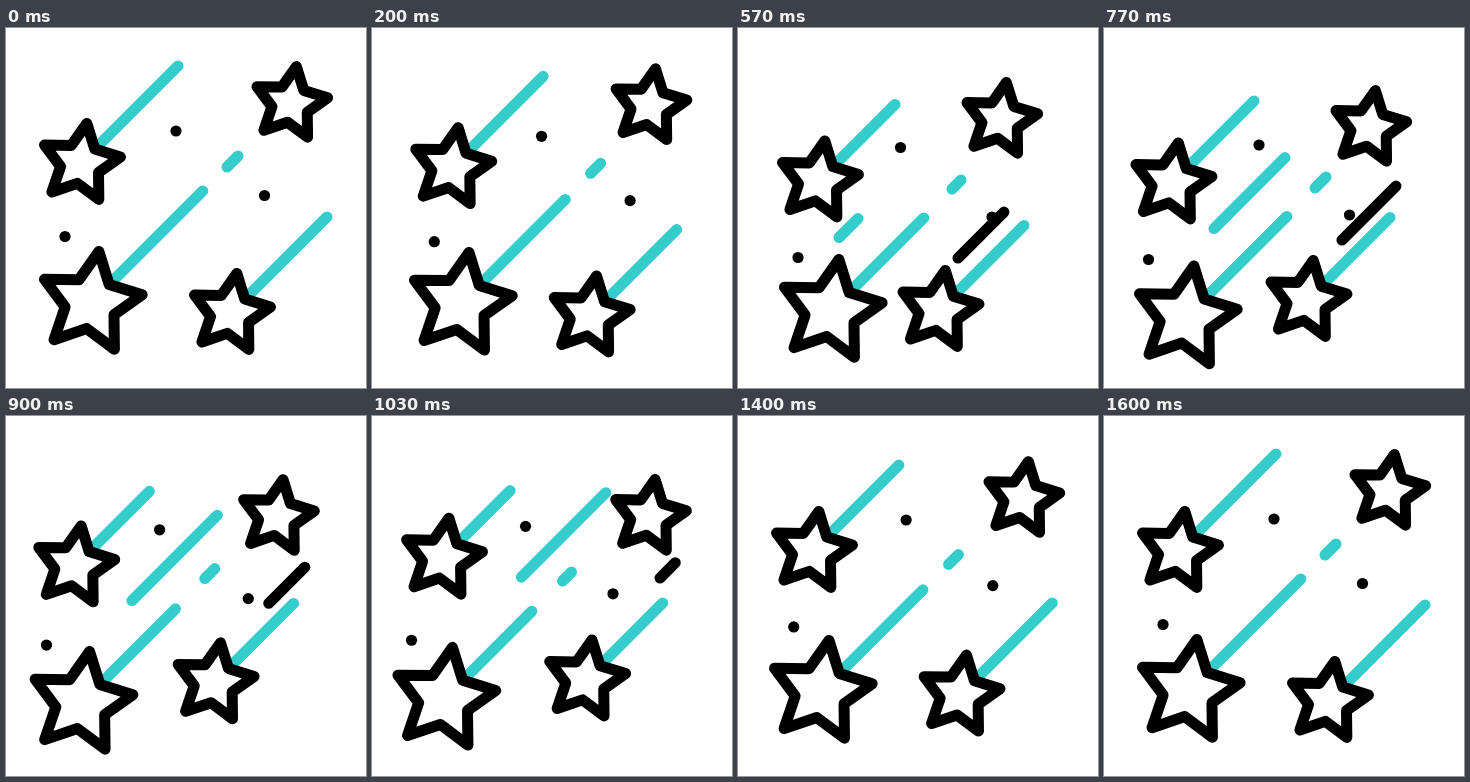
An HTML page that plays this animation: 360 by 360 pixels, repeating every 1670 ms.

```html
<!DOCTYPE html>
<html lang="en">
<head>
<meta charset="utf-8">
<title>Shooting stars</title>
<style>
  html, body { margin: 0; width: 100%; height: 100%; overflow: hidden; background: #fff; }
  svg { display: block; width: 100%; height: 100%; }
  path, line { stroke-width: 11; stroke-linecap: round; stroke-linejoin: round; }
</style>
</head>
<body>
<svg id="stage" viewBox="0 0 360 360"></svg>
<script>
const LOOP = 1670, STEP = 100 / 3;
const CYAN = '#35cccc', INK = '#000';
const TIMES = [33, 370, 570, 770, 1030, 1230, 1600];
const svg = document.getElementById('stage');

function add(tag, attrs) {
  const el = document.createElementNS('http://www.w3.org/2000/svg', tag);
  set(el, attrs);
  return svg.appendChild(el);
}

function set(el, attrs) {
  for (const name in attrs) el.setAttribute(name, attrs[name]);
}

// Smooth curve through key values, at rest at both ends and at turning points.
function curve(values, times = TIMES) {
  const last = values.length - 1;
  const slope = i => (values[i + 1] - values[i]) / (times[i + 1] - times[i]);
  const tangent = values.map((v, i) => {
    if (i === 0 || i === last || slope(i - 1) * slope(i) <= 0) return 0;
    return (values[i + 1] - values[i - 1]) / (times[i + 1] - times[i - 1]);
  });
  return t => {
    if (t <= times[0]) return values[0];
    if (t >= times[last]) return values[last];
    let i = 0;
    while (t > times[i + 1]) i++;
    const d = times[i + 1] - times[i], u = (t - times[i]) / d, w = 1 - u;
    return w * w * ((1 + 2 * u) * values[i] + u * d * tangent[i]) +
           u * u * ((3 - 2 * u) * values[i + 1] - w * d * tangent[i + 1]);
  };
}

// Closed track: the first value is also the last one.
const loop = values => curve([...values, values[0]]);

function starPath(r) {
  const points = Array.from({ length: 10 }, (_, i) => {
    const a = (-81 + 36 * i) * Math.PI / 180, d = i % 2 ? r * 0.5 : r;
    return (d * Math.cos(a)).toFixed(2) + ' ' + (d * Math.sin(a)).toFixed(2);
  });
  return 'M' + points.join('L') + 'Z';
}

const parts = [];

// Line on the diagonal x + y = sum, trimmed between tail and head.
function streak(color, sum, times, tail, head) {
  const el = add('line', { stroke: color });
  const a = curve(tail, times), b = curve(head, times);
  const start = times[0], end = times[times.length - 1];
  parts.push(t => {
    const x1 = a(t), x2 = b(t);
    set(el, {
      x1, y1: sum - x1, x2, y2: sum - x2,
      visibility: t > start && t < end ? 'visible' : 'hidden'
    });
  });
}

function star(cx, cy, r, dx, dy, trail) {
  const x = loop(dx), y = loop(dy), length = trail && loop(trail);
  const tail = trail && add('line', { stroke: CYAN });
  const body = add('path', { d: starPath(r), fill: '#fff', stroke: INK });
  parts.push(t => {
    const px = cx + x(t), py = cy + y(t);
    set(body, { transform: `translate(${px} ${py})` });
    if (!tail) return;
    const a = r * 0.36, b = length(t);
    set(tail, { x1: px + a, y1: py - a, x2: px + b, y2: py - b });
  });
}

function dot(xs, ys) {
  const el = add('circle', { r: 5.6, fill: INK });
  const x = loop(xs), y = loop(ys);
  parts.push(t => set(el, { cx: x(t), cy: y(t) }));
}

function dash(xs, ys, halves) {
  const el = add('line', { stroke: CYAN });
  const x = loop(xs), y = loop(ys), half = loop(halves);
  parts.push(t => {
    const px = x(t), py = y(t), h = half(t);
    set(el, { x1: px - h, y1: py + h, x2: px + h, y2: py - h });
  });
}

streak(CYAN, 310.5, [460, 570, 770, 1030, 1230, 1380],
  [99, 101, 110, 148, 206, 242], [99, 120, 181, 233, 242, 242]);
streak(INK, 450, [300, 370, 570, 770, 1030, 1230, 1260],
  [208, 211, 220, 238, 287, 310.5, 311], [208, 226, 266, 292, 303, 311, 311]);

dash([226.5, 219.5, 218.5, 216.5, 195, 201.5],
  [133.5, 150.5, 156.5, 154.5, 160.5, 156], [5.5, 4.5, 4.5, 5.5, 4.5, 4.5]);

star(74.5, 135.4, 40.4, [0, 10.5, 6, -6.5, -4, 0], [0, 11, 17.5, 19.5, 7, 0],
  [97.5, 82, 76.5, 82, 67.5, 72.5]);
star(284.5, 75.7, 37.6, [0, -17, -22, -19, -7.5, -1.2], [0, 7, 16, 24, 25, 17]);
star(224.5, 285.4, 40.4, [0, -16, -23.5, -21.5, -11, -6], [0, 5, -3, -13, -21.5, -15],
  [96.5, 76.5, 85, 83, 77, 85.5]);
star(84.8, 274.9, 52, [0, 8, 8, -3, -12.5, -5.5], [0, 3, 8, 14.5, 8, 3],
  [112, 94, 93, 101, 87.5, 90]);

dot([170, 168, 162.5, 155, 153.5, 164], [103, 116, 119.5, 117, 110.5, 106]);
dot([258.5, 257, 254, 245.5, 241, 249], [167.5, 181, 189, 187, 178, 173]);
dot([59, 65.5, 60, 44.5, 39.5, 50], [208.5, 222, 229.5, 231.5, 224.5, 215.5]);

function draw(now) {
  const t = Math.floor((now % LOOP + 4) / STEP) * STEP + 3;
  parts.forEach(part => part(t));
}

const begin = performance.now();
function tick() {
  draw(performance.now() - begin);
  requestAnimationFrame(tick);
}
tick();
</script>
</body>
</html>
```
